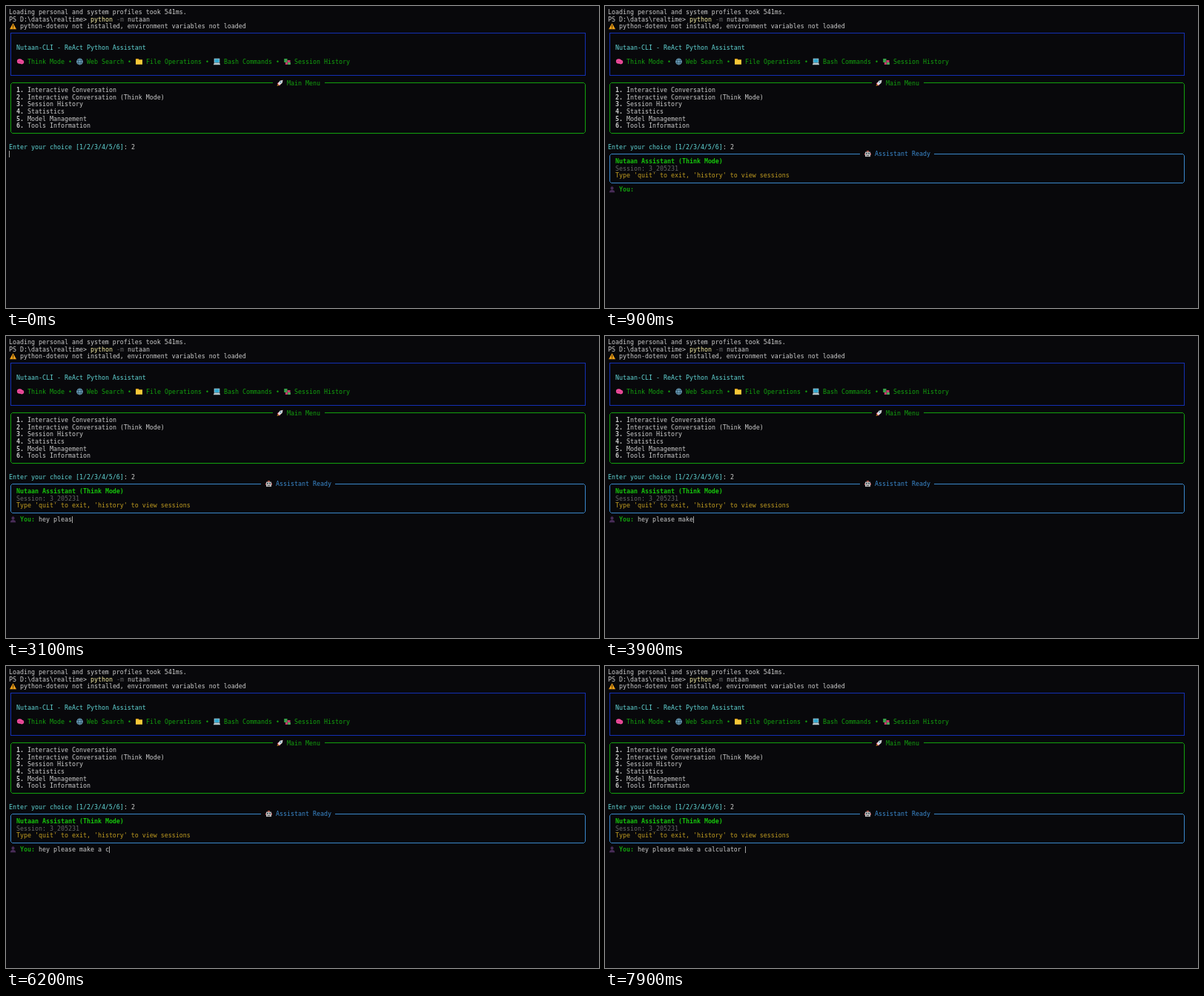
These frames come from a looping animation (800x407 px, 8 s). An HTML page with a canvas:

```html
<!DOCTYPE html>
<html lang="en">
<head>
<meta charset="utf-8">
<title>Terminal session</title>
<style>
html, body { margin: 0; width: 800px; height: 407px; overflow: hidden; background: #08080b; }
canvas { display: block; }
</style>
</head>
<body>
<canvas width="800" height="407"></canvas>
<script>
const ctx = document.querySelector('canvas').getContext('2d');
const LOOP = 8000, READY = 900, BLINK = 540;
const BACK = '#08080b', GREY = '#cccccc', CYAN = '#61d6d6', GREEN = '#13a10e', BRIGHT = '#16c60c',
      BLUE = '#1430b4', STEEL = '#3a88cc', AMBER = '#c19c20', DIM = '#666666';

const colX = col => 4 + 5 * col;
const rowY = row => 8 + 9.57 * row;

function text(col, row, str, color = GREY, weight = '') {
  ctx.font = `${weight} 8.305px "DejaVu Sans Mono", monospace`;
  ctx.fillStyle = color;
  ctx.fillText(str, colX(col), rowY(row) + 3);
}

function path(color, points, width = 1) {
  ctx.strokeStyle = color;
  ctx.lineWidth = width;
  ctx.beginPath();
  points.forEach(([x, y]) => ctx.lineTo(x, y));
  ctx.stroke();
}

function rect(color, x, y, w, h) {
  ctx.fillStyle = color;
  ctx.fillRect(x, y, w, h);
}

function oval(color, x, y, rx, ry = rx) {
  ctx.fillStyle = color;
  ctx.beginPath();
  ctx.ellipse(x, y, rx, ry, 0, 0, 7);
  ctx.fill();
}

function poly(color, points) {
  ctx.fillStyle = color;
  ctx.beginPath();
  points.forEach(([x, y]) => ctx.lineTo(x, y));
  ctx.fill();
}

// Each icon is drawn around the centre of a two-column cell.
const icons = {
  warning() {
    poly('#f0a018', [[0, -4], [4.5, 4], [-4.5, 4]]);
    rect('#302000', -.5, -1.5, 1, 3);
    rect('#302000', -.5, 2.2, 1, 1);
  },
  brain() {
    oval('#f04c9c', -1, -.5, 3.6, 3.2);
    oval('#f04c9c', 1.8, .6, 2.9, 2.8);
    path('#b03078', [[-3.5, 0], [-1.5, -1], [1, 1], [3.5, 0]], .6);
  },
  globe() {
    oval('#6c9cb8', 0, 0, 4.4);
    path('#2c5060', [[-4, -1.5], [4, -1.5]], .7);
    path('#2c5060', [[-4, 1.5], [4, 1.5]], .7);
    ctx.beginPath();
    ctx.ellipse(0, 0, 2, 4.2, 0, 0, 7);
    ctx.stroke();
  },
  folder() {
    rect('#d09818', -4.5, -4, 4, 3);
    rect('#f8c838', -4.5, -2.7, 9, 6.5);
  },
  laptop() {
    rect('#a8c4cc', -3.8, -4.3, 7.6, 6);
    rect('#30a8d0', -3, -3.5, 6, 4.5);
    poly('#b8c8cc', [[-3.8, 2], [3.8, 2], [4.7, 4.2], [-4.7, 4.2]]);
  },
  books() {
    rect('#38a048', -4.3, -4, 4.3, 5);
    rect('#c83c70', 0, -2, 4, 3);
    rect('#c83c70', -2.6, 1, 3, 3);
    rect('#48a858', .6, 1, 3.8, 3);
  },
  rocket() {
    poly('#e03870', [[-3.8, .5], [-1.5, -1], [1, 1.5], [-.5, 4]]);
    poly('#e0e0e0', [[4, -4], [3.2, 0], [-.5, 3], [-2.8, .8], [0, -3]]);
    oval('#5090b0', 1, -1.2, 1);
    poly('#f0a020', [[-2.5, 1.5], [-1, 3], [-4, 4]]);
  },
  robot() {
    rect('#c0c0c0', -3.5, -2.8, 7, 6.5);
    rect('#b05058', -4.5, -1, 1, 2.5);
    rect('#b05058', 3.5, -1, 1, 2.5);
    rect('#d07060', -1.5, -4.3, 3, 1.5);
    oval('#304048', -1.6, -.7, 1);
    oval('#304048', 1.6, -.7, 1);
    rect('#504848', -1.8, 1.7, 3.6, 1);
  },
  person() {
    oval('#482c58', 0, -1.8, 2, 2.3);
    poly('#482c58', [[-3.8, 4], [-3, 1.5], [-1, .7], [1, .7], [3, 1.5], [3.8, 4]]);
  }
};

function icon(name, col, row) {
  ctx.save();
  ctx.translate(colX(col) + 5.5, rowY(row));
  icons[name]();
  ctx.restore();
}

// Rounded frame with a gap in its top edge for the title.
function panel(top, bottom, gap, color) {
  const l = 6.5, r = 781.5, t = Math.floor(rowY(top)) + .5, b = Math.round(rowY(bottom)) + .5;
  path(color, [[gap[1], t], [r - 2, t], [r, t + 2], [r, b - 2], [r - 2, b],
               [l + 2, b], [l, b - 2], [l, t + 2], [l + 2, t], [gap[0], t]]);
}

const features = [[2, 'brain', 'Think Mode'], [18, 'globe', 'Web Search'], [34, 'folder', 'File Operations'],
                  [55, 'laptop', 'Bash Commands'], [74, 'books', 'Session History']];
const menu = ['Interactive Conversation', 'Interactive Conversation (Think Mode)', 'Session History',
              'Statistics', 'Model Management', 'Tools Information'];

function drawMenu() {
  text(0, 0, 'Loading personal and system profiles took 541ms.');
  text(0, 1, 'PS D:\\datas\\realtime>');
  text(22, 1, 'python', '#f9f1a5');
  text(29, 1, '-m', DIM);
  text(32, 1, 'nutaan');
  icon('warning', 0, 2);
  text(3, 2, 'python-dotenv not installed, environment variables not loaded');

  ctx.strokeStyle = BLUE;
  ctx.lineWidth = 1;
  ctx.strokeRect(6.5, 36.5, 775, 57);
  text(2, 5, 'Nutaan-CLI - ReAct Python Assistant', CYAN);
  features.forEach(([col, name, label], i) => {
    icon(name, col, 7);
    text(col + 3, 7, label + (i < 4 ? ' •' : ''), GREEN);
  });

  panel(10, 17, [360, 430], GREEN);
  icon('rocket', 72, 10);
  text(75, 10, 'Main Menu', GREEN);
  menu.forEach((label, i) => {
    text(2, 11 + i, i + 1 + '.', GREY, 'bold');
    text(5, 11 + i, label);
  });
  text(0, 19, 'Enter your choice [1/2/3/4/5/6]', CYAN);
  text(31, 19, ': 2');
}

function drawAssistant(input) {
  panel(20, 24, [344, 444], STEEL);
  icon('robot', 69, 20);
  text(72, 20, 'Assistant Ready', STEEL);
  text(2, 21, 'Nutaan Assistant (Think Mode)', BRIGHT, 'bold');
  text(2, 22, 'Session: 3_205231', DIM);
  text(2, 23, "Type 'quit' to exit, 'history' to view sessions", AMBER);
  icon('person', 0, 25);
  text(3, 25, 'You:', GREEN, 'bold');
  text(8, 25, input);
}

const keys = [{ at: 0, input: '' }];
function type(start, gap, chars) {
  [...chars].forEach((c, i) => {
    const { input } = keys[keys.length - 1];
    keys.push({ at: start + i * gap, input: c === '\b' ? input.slice(0, -1) : input + c });
  });
}
type(2600, 100, 'he');
type(2800, 50, 'y pleas');
type(3220, 120, 'e make a p');
type(5500, 100, '\b');
type(6100, 100, 'c');
type(6300, 130, 'alculator ');

function draw(t) {
  const ready = t >= READY;
  const { at, input } = keys.filter(k => k.at <= t).pop();
  rect(BACK, 0, 0, 800, 407);
  drawMenu();
  if (ready) drawAssistant(input);
  // Every key press restarts the blink.
  if (Math.floor((t - at) / BLINK) % 2 === 0) {
    const x = colX(ready ? 8 + input.length : 0), y = rowY(ready ? 25 : 20);
    rect('#a0a0a0', x, Math.round(y) - 4, 1, 9);
  }
}

const begin = performance.now();
function frame() {
  const t = (performance.now() - begin) % LOOP;
  draw(Math.floor(t / 100) * 100);
  requestAnimationFrame(frame);
}
frame();
</script>
</body>
</html>
```
